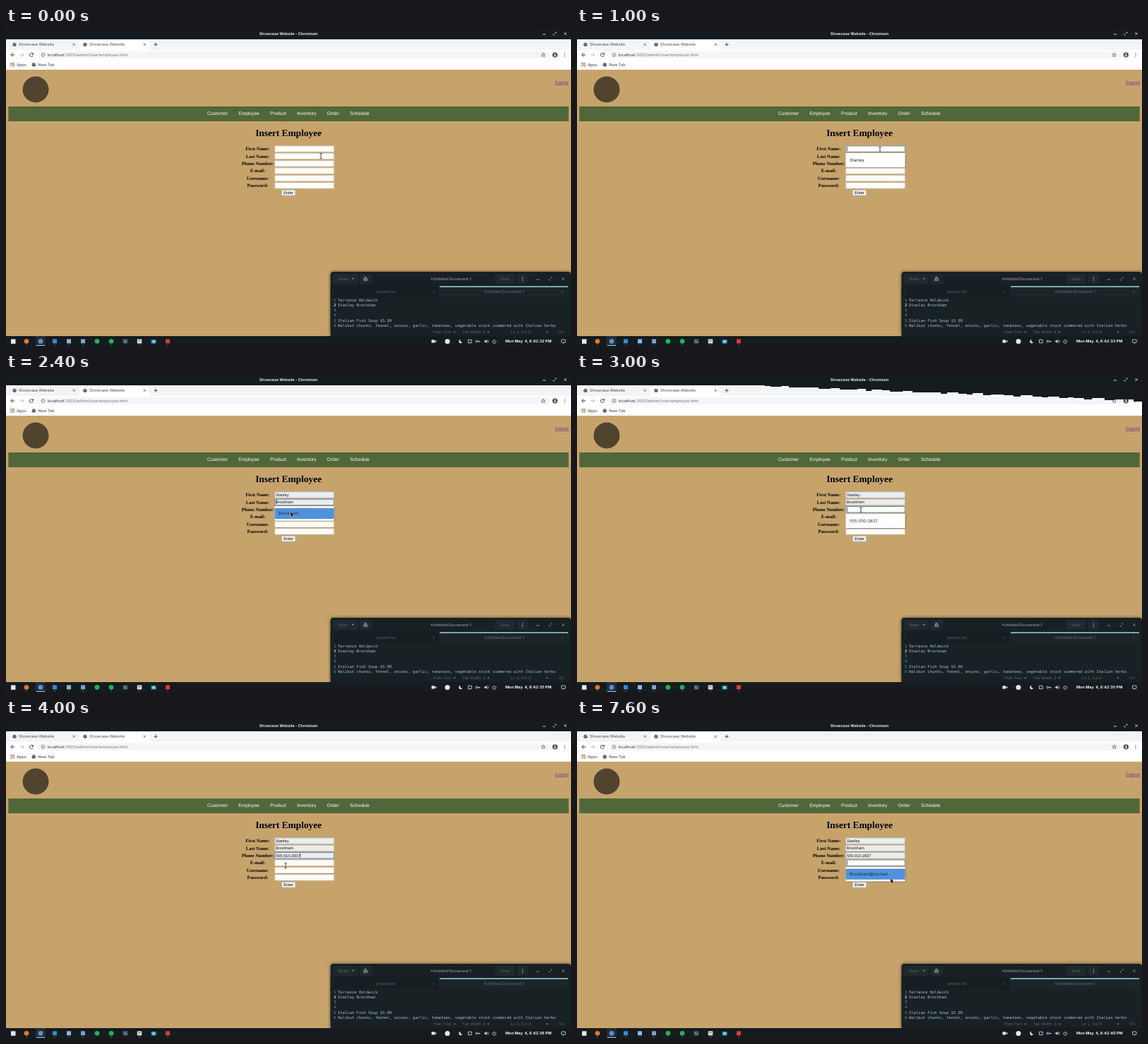
Write an HTML page with a canvas that moves like this. It is 800 px wide and 450 px high and loops after 8000 ms.

```html
<!DOCTYPE html>
<html lang="en">
<head>
<meta charset="utf-8">
<title>Insert Employee</title>
<style>
html, body { margin: 0; width: 100%; height: 100%; overflow: hidden; background: #c7a36c; }
canvas { display: block; width: 800px; height: 450px; }
</style>
</head>
<body>
<canvas id="stage" width="800" height="450"></canvas>
<script>
const g = document.getElementById('stage').getContext('2d');
const LOOP = 8000, STEP = 200;
const UI = 'Inter, sans-serif', ARIAL = '"Liberation Sans", sans-serif';
const SERIF = '"Liberation Serif", serif', MONO = '"DejaVu Sans Mono", monospace';
const DARK = '#151b1e', PAGE = '#c7a36c', DIM = '#59666a';

const SITE = 'Showcase Website';
const LABELS = ['First Name:', 'Last Name:', 'Phone Number:', 'E-mail:', 'Username:', 'Password:'];
const VALUES = ['Stanley', 'Brockham', '555-010-2837', 'Brockham@mx.test'];
const NOTES = ['Terrance Holdwick', 'Stanley Brockham', '', '', 'Italian Fish Soup $5.99',
  'Halibut chunks, fennel, onions, garlic, tomatoes, vegetable stock simmered with Italian herbs'];

// start time, focused row, suggestion list open
const PHASES = [[0, -1, 0], [800, 0, 1], [1600, 0, 0], [1800, 1, 1], [2800, 1, 0],
  [3000, 2, 1], [3800, 2, 0], [7200, 3, 1]];
// time, x, y of the pointer
const PATH = [[0, 446, 181], [400, 438, 176], [800, 429, 172], [1000, 429, 172], [1200, 427, 178],
  [1400, 416, 187], [1600, 410, 186], [1800, 405, 181], [2200, 403, 193], [2400, 403, 195],
  [2600, 403, 195], [2800, 402, 196], [3000, 402, 192], [3600, 399, 207], [4000, 396, 206],
  [4600, 402, 204], [5200, 412, 201], [7000, 412, 201], [7200, 416, 202], [7400, 430, 209],
  [7600, 444, 224], [8000, 444, 224]];
const TEARS = [800, 3000];

function box(x, y, w, h, color, r = 0) {
  g.fillStyle = color;
  g.beginPath();
  g.roundRect(x, y, w, h, r);
  g.fill();
}
function frame(x, y, w, h, color, width = 0.8, r = 0) {
  g.strokeStyle = color;
  g.lineWidth = width;
  g.beginPath();
  g.roundRect(x, y, w, h, r);
  g.stroke();
}
function dot(x, y, r, color) {
  g.fillStyle = color;
  g.beginPath();
  g.arc(x, y, r, 0, 7);
  g.fill();
}
function text(s, x, y, font, color, align = 'left') {
  g.font = font;
  g.fillStyle = color;
  g.textAlign = align;
  g.fillText(s, x, y);
}
function path(d, x, y, color, width = 0.9) {
  g.save();
  g.translate(x, y);
  g.strokeStyle = g.fillStyle = color;
  g.lineWidth = width;
  const p = new Path2D(d);
  width ? g.stroke(p) : g.fill(p);
  g.restore();
}
const cross = (x, y, r, color) => path(`M${-r} ${-r}L${r} ${r}M${r} ${-r}L${-r} ${r}`, x, y, color, 0.8);
const caretDown = (x, y, color) => path('M-1.8-.9H1.8L0 1.1Z', x, y, color, 0);
const more = (x, y, color) => [-2.2, 0, 2.2].forEach(d => dot(x, y + d, 0.65, color));

function windowButtons(xs, y, color) {
  path('M-2 1H2', xs[0], y, color);
  path('M.3-1.9H1.9V-.3M-.3 1.9H-1.9V.3', xs[1], y, color);
  cross(xs[2], y, 1.7, color);
}
function globe(x, y) {
  dot(x, y, 2.6, '#45494d');
  path('M-2.2-.8L-.4-.3L.2 .8L-.8 2M.6-2.2L.4-.9L2.2-.4', x, y, '#d5d8da', 0.6);
}

function browser() {
  box(0, 0, 800, 16, DARK);
  text(SITE + ' - Chromium', 400, 10.1, '700 5.4px ' + UI, '#e4e7e8', 'center');
  windowButtons([762, 777, 792], 8, '#dfe3e4');
  box(0, 16, 800, 15, '#f3f4f5');
  box(104, 17, 99, 14, '#fff', [3, 3, 0, 0]);
  box(0, 31, 800, 28, '#fff');
  for (const x of [0, 100]) {
    globe(x + 12, 23.3);
    text(SITE, x + 18, 25.4, '5.6px ' + UI, '#45494d');
    cross(x + 96.3, 23.3, 1.6, '#50555a');
  }
  path('M-2.6 0H2.6M0-2.6V2.6', 212, 23.3, '#3c4043');
  path('M2.8 0H-2.6M0-2.6L-2.6 0L0 2.6', 9.5, 38, '#3c4043', 1);
  path('M-2.8 0H2.6M0-2.6L2.6 0L0 2.6', 22.5, 38, '#b8bbbe', 1);
  path('M2.3-.9A2.5 2.5 0 1 0 2.3 1M2.5-2.8V-.7H.4', 36, 38, '#3c4043', 1);
  box(45, 33, 726, 10, '#f3f5f6', 5);
  path('M2.4 0A2.4 2.4 0 1 0-2.4 0A2.4 2.4 0 1 0 2.4 0M0-.3V1.4M0-1.4V-.8', 52.5, 38, '#5f6368', 0.7);
  const host = 'localhost';
  text(host, 58.7, 39.9, '5.6px ' + UI, '#33373a');
  text(':3003/admin/insertemployee.html', 58.7 + g.measureText(host).width, 39.9, '5.6px ' + UI, '#74787c');
  path('M0-2.8L.8-.9L2.8-.8L1.2.5L1.8 2.5L0 1.4L-1.8 2.5L-1.2.5L-2.8-.8L-.8-.9Z', 760.7, 38, '#4b4f53', 0.7);
  dot(777.3, 38, 3.6, '#3c4043');
  dot(777.3, 36.9, 1.1, '#fff');
  box(775.3, 38.7, 4, 1.4, '#fff', 0.7);
  more(791, 38, '#4b4f53');
  const tiles = ['#d94b3f', '#e8a33c', '#4a9a58', '#4a84d4'];
  for (let i = 0; i < 9; i++) box(6.2 + i % 3 * 2.1, 49 + (i / 3 | 0) * 2.1, 1.5, 1.5, tiles[i * 3 % 4]);
  text('Apps', 15, 54, '5.6px ' + UI, '#3c4043');
  globe(39.3, 51.9);
  text('New Tab', 45.3, 54, '5.6px ' + UI, '#3c4043');
}

function page() {
  box(0, 59, 800, 377, PAGE);
  dot(42, 87, 18.5, '#51442f');
  text('Logout', 777, 79, 'italic 7px ' + SERIF, '#6a2a86');
  box(777, 80, 20, 0.6, '#6a2a86');
  box(3.3, 111, 793.4, 21, '#51673a');
  const nav = { Customer: 285, Employee: 329.2, Product: 374, Inventory: 412, Order: 454.6, Schedule: 487 };
  for (const s in nav) text(s, nav[s], 123, '6.67px ' + ARIAL, '#fff');
  text('Insert Employee', 400, 153, '700 13.33px ' + SERIF, '#000', 'center');
  LABELS.forEach((s, i) => text(s, 356.4, rowY(i) + 2.2, '700 6.67px ' + SERIF, '#000', 'center'));
  box(390, 229, 20, 8.3, '#efefef', 0.8);
  frame(390.2, 229.2, 19.6, 8, '#8a8780', 0.5, 0.8);
  text('Enter', 400, 235.1, '5.56px ' + ARIAL, '#000', 'center');
}

const rowY = i => 171 + i * 10.37;

function form(t, mouse) {
  const [, focus, open] = PHASES.findLast(p => p[0] <= t);
  const hover = open && mouse.y > rowY(focus) + 8;
  for (let i = 0; i < 6; i++) {
    const y = rowY(i), active = i === focus;
    const preview = active && hover && i < 3;
    const filled = i < focus || active && !open || preview;
    box(380.5, y - 4.3, 84, 8.7, filled ? '#e6eef7' : '#fff');
    frame(380.7, y - 4.1, 83.6, 8.3, active ? '#55779c' : '#b5a388', active ? 0.8 : 0.5);
    if (filled) text(VALUES[i], 381.9, y + 2, '5.56px ' + ARIAL, '#111');
    const caretOn = t < 4600 || t >= 5200 && t < 6200 || t >= 7200;
    if (active && caretOn) {
      const end = filled && !preview ? g.measureText(VALUES[i]).width : 0;
      box(382 + end, y - 3.2, 0.6, 6.4, '#000');
    }
  }
  if (open) {
    const y = rowY(focus);
    g.save();
    g.shadowColor = '#0006';
    g.shadowBlur = 2;
    g.shadowOffsetY = 0.5;
    box(380.5, y + 6, 84, 20.3, '#fff');
    g.restore();
    if (hover) box(380.5, y + 8.4, 84, 15.2, '#5190da');
    text(VALUES[focus], 386, y + 18, '5.9px ' + UI, hover ? '#142a48' : '#222');
  }
  return open && mouse.y > rowY(focus) + 6;
}

function editor() {
  g.save();
  g.shadowColor = '#0008';
  g.shadowBlur = 5;
  box(459.5, 345, 340.5, 91, '#182023', [4, 4, 0, 0]);
  g.restore();
  box(463, 348, 35, 14, '#202a2e', 2);
  box(500.5, 348, 17, 14, '#202a2e', 2);
  box(692.5, 348, 28, 14, '#202a2e', 2);
  box(724, 348, 15, 14, '#202a2e', 2);
  text('Open', 470, 357, '5.6px ' + UI, DIM);
  caretDown(491, 355, '#8b979b');
  path('M-2.4 2.3V.2H2.4V2.3ZM-1.2.2V-2.4H1.2V.2', 509, 355, '#a5b0b3');
  text('*Untitled Document 1', 629.7, 357, '700 5.5px ' + UI, '#75838a', 'center');
  text('Save', 706.5, 357, '5.6px ' + UI, DIM, 'center');
  more(731.5, 355, '#b5bfc2');
  windowButtons([753, 771, 789], 355, '#8b979b');

  box(459.5, 365, 340.5, 16, '#161e21');
  box(614, 365, 182, 16, '#1b2528');
  box(614, 365.2, 182, 1.6, '#9bd5e2');
  for (const x of [463, 613.6, 796]) box(x, 366, 0.5, 14, '#28343a');
  text('project.txt', 538, 375.3, '5.7px ' + UI, DIM, 'center');
  text('*Untitled Document 1', 705, 375.3, '5.7px ' + UI, '#65747a', 'center');
  cross(605.5, 373.3, 1.3, '#465257');
  cross(788, 373.3, 1.3, '#465257');

  box(459.5, 381, 340.5, 46, '#182124');
  NOTES.forEach((s, i) => {
    const y = 387.2 + i * 7.08;
    text(i + 1, 467.2, y, (i === 1 ? '700 ' : '') + '5.53px ' + MONO, i === 1 ? '#c6dadd' : '#5f97a3', 'right');
    text(s, 469.8, y, '5.53px ' + MONO, '#a6c3c3');
  });
  const small = '5.5px ' + UI;
  text('Plain Text', 605, 432.2, small, DIM);
  text('Tab Width: 8', 646, 432.2, small, DIM);
  text('Ln 2, Col 9', 715, 432.2, small, DIM);
  text('INS', 782, 432.2, small, '#465257');
  for (const x of [635, 683, 766]) caretDown(x, 430.3, '#75838a');
}

function taskbar(t) {
  box(0, 436, 800, 14, DARK);
  box(42, 436, 14, 14, '#232d32');
  box(7, 440.3, 6.5, 6.5, '#e3e8ea');
  const round = { 29: '#e9732c', 49: '#5b8fd6', 129: '#1fb455', 149: '#1fb455' };
  const square = { 69: '#2f8ed2', 89: '#8fb6de', 109: '#7d9fd4', 229: '#db3c2f' };
  for (const x in round) dot(+x, 443.3, 3.4, round[x]);
  for (const x in square) box(x - 3, 440.3, 6, 6, square[x]);
  box(165.7, 440.2, 6.6, 6.2, '#465a66', 0.8);
  path('M-2-1.4L-.6 0L-2 1.4M.2 1.4H2', 169, 443.3, '#d8e2e5', 0.6);
  box(185.7, 440.2, 6.6, 6.4, '#cfd8d3', 0.8);
  box(187.5, 442, 3, 1, '#4f6f5d');
  box(205.7, 441, 6.8, 5.4, '#29a8cf', 0.8);
  dot(209, 443.7, 1.3, '#e7f3f6');
  for (const x of [29, 69, 89, 109, 149, 189, 229]) dot(x, 448.8, 0.6, '#6fb6d6');
  box(43, 448.8, 12, 1.2, '#7cc0dc');

  const ink = '#e3e8ea';
  box(602.5, 441.3, 4.7, 4.2, ink, 0.6);
  path('M0 0L2.4-1.6V1.6Z', 607, 443.4, ink, 0);
  dot(625, 443.4, 3.5, ink);
  path('M-.6-2.6A2.7 2.7 0 1 0 2.4 1.1A2.6 2.6 0 0 1-.6-2.6Z', 644, 443.4, ink, 0);
  frame(654.5, 441.2, 4.6, 4.4, ink);
  path('M-.4-.9A1.4 1.4 0 1 0-.4.9M-.5 0H2.8V1.4', 668, 443.4, ink, 1);
  path('M-2.8-.9H-1.4L.4-2.6V2.6L-1.4.9H-2.8Z', 680, 443.4, ink, 0);
  path('M1.2-1.3A1.8 1.8 0 0 1 1.2 1.3M2-2.3A3 3 0 0 1 2 2.3', 680, 443.4, ink, 0.6);
  path('M-1.4-1.8A2.4 2.4 0 1 0 1.4-1.8M0-2.8V0', 691.3, 443.6, ink, 0.8);
  const sec = 32 + Math.floor((t + 800) / 1000);
  text(`Mon May  4, 8:42:${sec} PM`, 707, 445.3, '700 5.5px ' + UI, '#f0f3f4');
  frame(786.5, 441, 5.6, 4.2, ink, 0.8, 0.8);
  path('M-.9 0H.9L0 1.3Z', 789.3, 445.4, ink, 0);
}

// Ragged dark wedge hanging from the title bar
function tear() {
  g.fillStyle = DARK;
  for (let x = 266, i = 0; x < 800; i++) {
    const w = 8 + i * 7 % 11;
    const depth = 1 + (x - 266) / 534 * 21 + Math.sin(i * 2.4) * 1.1;
    g.fillRect(x, 16, w + 0.2, Math.round(depth));
    x += w;
  }
}

function pointerAt(t) {
  const k = PATH.findIndex(p => p[0] > t);
  const [t0, x0, y0] = PATH[k - 1], [t1, x1, y1] = PATH[k];
  const f = (t - t0) / (t1 - t0);
  return { x: x0 + (x1 - x0) * f, y: y0 + (y1 - y0) * f };
}

function pointer({ x, y }, arrow) {
  if (arrow) {
    const d = 'M0 0V6.6L1.5 5.2L2.5 7.4L3.5 6.9L2.5 4.8H4.6Z';
    path(d, x, y, '#fff', 1);
    path(d, x, y, '#000', 0);
  } else {
    const d = 'M-1.7-3.6H-.5L0-3.2L.5-3.6H1.7M0-3.2V3.2M-1.7 3.6H-.5L0 3.2L.5 3.6H1.7';
    path(d, x, y, '#fff9', 1.7);
    path(d, x, y, '#111', 0.8);
  }
}

function draw(now) {
  const t = Math.floor(now % LOOP / STEP) * STEP;
  const mouse = pointerAt(t);
  g.textRendering = 'geometricPrecision';
  browser();
  page();
  const overList = form(t, mouse);
  editor();
  taskbar(t);
  if (TEARS.includes(t)) tear();
  pointer(mouse, overList);
}

const start = performance.now();
function tick() {
  draw(performance.now() - start);
  requestAnimationFrame(tick);
}
tick();
</script>
</body>
</html>
```
